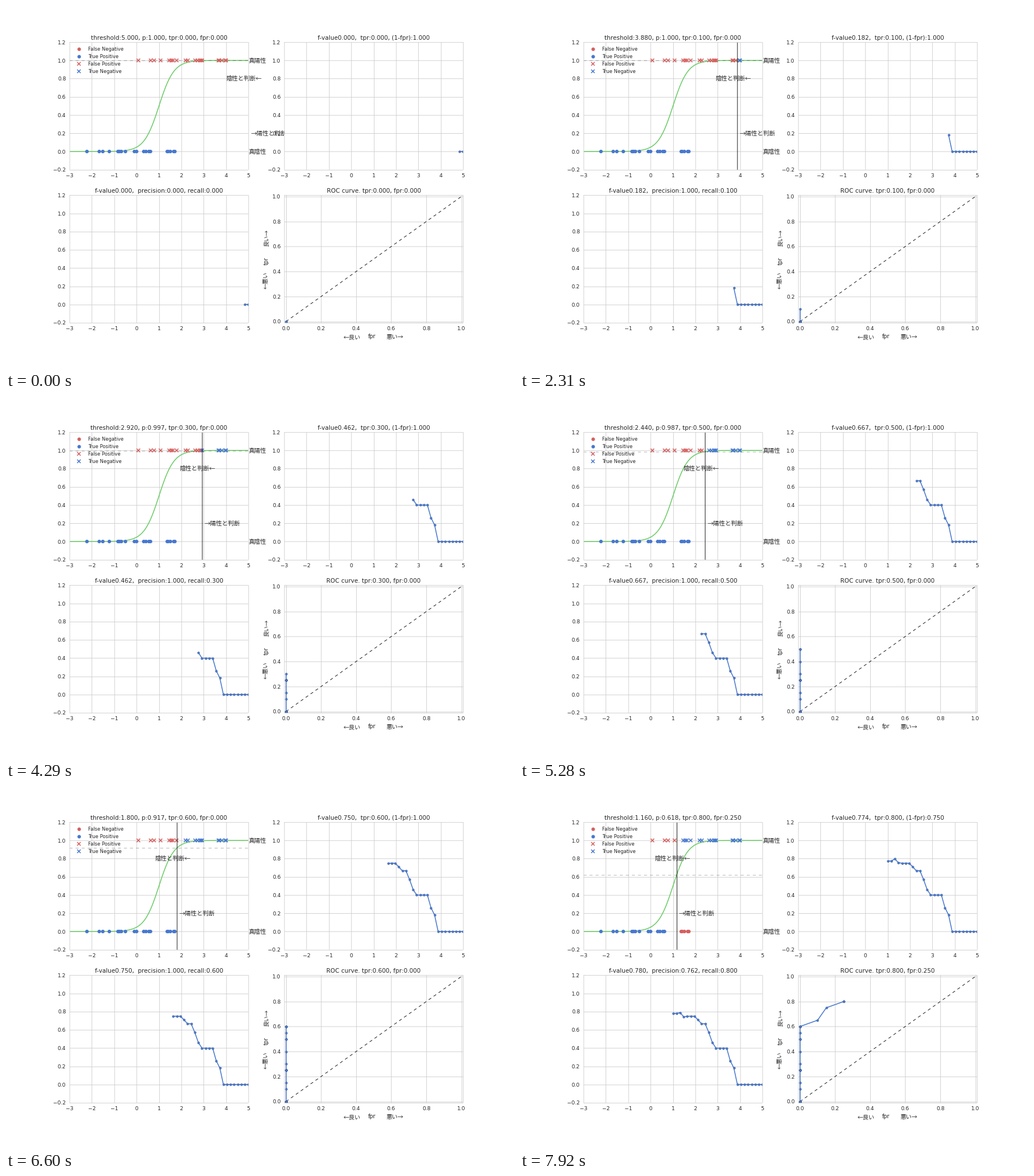
A matplotlib script for the animation above (8 s loop, 885 by 632 pixels).

```python
import numpy as np
import matplotlib.pyplot as plt
from matplotlib.animation import FuncAnimation
from matplotlib.transforms import IdentityTransform, blended_transform_factory

W, H, DPI = 885, 632, 72
BASE = (1008, 720)                    # layout canvas, shrunk to the stage
S = W / BASE[0]
STEP, START = 0.16, 5.0
STATES, HOLD = 25, 4
FRAMES = (STATES - 1) * HOLD + 1      # the last state is held only briefly
LOOP = 8000

BLUE, GREEN, RED = "#4878CF", "#6ACC65", "#D65F5F"
INK, GRID = "#262626", "#CCCCCC"
JP = "Noto Sans CJK JP"
DASH = (0, (6 * S, 6 * S))

pos = np.array([0.08, 0.63, 0.78, 1.07, 1.46, 1.55, 1.62, 1.79, 2.19, 2.29,
                2.62, 2.72, 2.83, 2.88, 2.93, 3.66, 3.70, 3.81, 3.97, 4.00])
neg = np.array([-2.22, -1.67, -1.51, -1.22, -0.83, -0.80, -0.76, -0.68, -0.50, -0.10,
                0.00, 0.32, 0.42, 0.55, 0.62, 1.37, 1.41, 1.51, 1.66, 1.71])

plt.rcParams.update({
    "font.family": ["DejaVu Sans", JP], "text.color": INK,
    "axes.titlesize": 10.4, "axes.titlepad": 5 * S, "axes.titley": 1.0,
    "xtick.labelsize": 9.1, "ytick.labelsize": 9.1,
    "xtick.major.size": 0, "ytick.major.size": 0,
    "xtick.major.pad": 7 * S, "ytick.major.pad": 7 * S,
    "xtick.labelcolor": INK, "ytick.labelcolor": INK,
    "lines.linewidth": 1.75 * S, "lines.scale_dashes": False,
})


def sigmoid(x):
    return 1 / (1 + np.exp(-3 * (x - 1)))


def harmonic(a, b):
    return 2 * a * b / (a + b) if a + b else 0.0


def measure(t):
    """tpr, fpr, precision, F of rates, F of precision and recall."""
    tp, fp = np.sum(pos >= t), np.sum(neg >= t)
    tpr, fpr = tp / len(pos), fp / len(neg)
    prec = tp / (tp + fp) if tp + fp else 0.0
    return tpr, fpr, prec, harmonic(tpr, 1 - fpr), harmonic(prec, tpr)


thresholds = START - STEP * np.arange(STATES)
stats = np.array([measure(t) for t in thresholds])
history = np.vstack([np.zeros(5), stats])
trail_x = START - STEP * np.arange(STATES + 1)

fig, ((ax_fit, ax_rate), (ax_prec, ax_roc)) = plt.subplots(
    2, 2, figsize=(W / DPI, H / DPI), dpi=DPI)
fig.subplots_adjust(left=0.125, right=0.9, bottom=0.125, top=0.9,
                    wspace=0.2, hspace=0.2)

for ax in (ax_fit, ax_rate, ax_prec):
    ax.set(xlim=(-3, 5), ylim=(-0.2, 1.2), xticks=np.arange(-3, 6),
           yticks=np.linspace(-0.2, 1.2, 8))
ax_roc.set(xlim=(-0.01, 1.01), ylim=(-0.01, 1.01),
           xticks=np.linspace(0, 1, 6), yticks=np.linspace(0, 1, 6))


def snapped(ax, value, axis):
    """Stage pixel of a value, aligned to pixel centres of the layout canvas."""
    size = (W, H)[axis]
    scale = size / BASE[axis]
    p = ax.transData.transform((value, value))[axis]
    p = p if axis == 0 else size - p
    p = (np.floor(p / scale + 0.5) + 0.5) * scale
    return p if axis == 0 else size - p


def rule(ax, value, axis, **kw):
    """Thin line across the axes: vertical for axis 0, horizontal for 1."""
    p = [snapped(ax, value, axis)] * 2
    pixel = IdentityTransform()
    if axis == 0:
        data, trans = (p, [0, 1]), blended_transform_factory(pixel, ax.transAxes)
    else:
        data, trans = ([0, 1], p), blended_transform_factory(ax.transAxes, pixel)
    return ax.plot(*data, transform=trans, lw=S, snap=False, scalex=False,
                   scaley=False, solid_capstyle="butt", **kw)[0]


for ax in fig.axes:
    ax.spines[:].set_visible(False)
    for axis, ticks, lim in ((0, ax.get_xticks(), ax.get_xlim()),
                             (1, ax.get_yticks(), ax.get_ylim())):
        for v in ticks:
            if lim[0] + 1e-6 < v < lim[1] - 1e-6:
                rule(ax, v, axis, color=GRID, zorder=0.5)
        for v in lim:
            rule(ax, v, axis, color=GRID, zorder=4.5, clip_on=False)


def pixel_text(x, y, s, size, **kw):
    kw = {"ha": "center", "va": "center", **kw}
    fig.text(x / W, 1 - y / H, s, size=size, **kw)


def jp_label(ax, x, y, s):
    return ax.text(x, y + 0.003, s, size=10.4, family=JP, va="center_baseline")


# threshold panel
curve_x = np.linspace(-3, 5, 200)
ax_fit.plot(curve_x, sigmoid(curve_x), color=GREEN)
level = rule(ax_fit, 1, 1, color="k", alpha=0.33, ls=DASH)
cut = rule(ax_fit, START, 0, color="k", zorder=4)
dots = ax_fit.scatter(neg, 0 * neg, s=39, lw=0, zorder=3)
crosses = ax_fit.scatter(pos, 0 * pos + 1, s=37, marker="x", lw=1.75 * S, zorder=3)
jp_label(ax_fit, 5, 1, "真陽性")
jp_label(ax_fit, 5, 0, "真陰性")
below = jp_label(ax_fit, 4, 0.8, "陰性と判断←")
above = jp_label(ax_fit, 5.1, 0.2, "→陽性と判断")

entries = [("False Negative", "o", RED), ("True Positive", "o", BLUE),
           ("False Positive", "x", RED), ("True Negative", "x", BLUE)]
box = ax_fit.get_position()
for i, (name, marker, color) in enumerate(entries):
    y = 75.2 + 13.1 * i
    ax_fit.plot((127.3 / W - box.x0) / box.width, (1 - y / H - box.y0) / box.height,
                marker, ms=6.15, mew=1.75 * S if marker == "x" else 0, color=color,
                transform=ax_fit.transAxes, zorder=5)
    ax_fit.text((143 / W - box.x0) / box.width, (1 - (y + 2.8) / H - box.y0) / box.height,
                name, size=8.4, transform=ax_fit.transAxes, zorder=5)


def trail(ax):
    line, = ax.plot([], [], color=BLUE)
    marks = ax.scatter([], [], s=16, color=BLUE, edgecolor="k", lw=0.15, zorder=3)
    return line, marks


def set_trail(pair, x, y):
    pair[0].set_data(x, y)
    pair[1].set_offsets(np.column_stack([x, y]))


rate_trail, prec_trail = trail(ax_rate), trail(ax_prec)
ax_roc.plot([0, 1], [0, 1], color="k", lw=S, ls=DASH)
roc_trail = trail(ax_roc)

for x, s in ((603, "←良い"), (678, "悪い→")):
    pixel_text(x, 577, s, 10, family=JP, va="center_baseline")
pixel_text(637.5, 577.5, "fpr", 9.5)
for y, s in ((479.5, "←悪い"), (404.5, "良い→")):
    pixel_text(453, y, s, 10, family=JP, rotation=90)
pixel_text(453.5, 445.5, "tpr", 9.5, rotation=90)


def update(frame):
    k = frame // HOLD
    t = thresholds[k]
    p = sigmoid(t)
    tpr, fpr, prec, f_rate, f_prec = stats[k]

    cut.set_xdata([snapped(ax_fit, t, 0)] * 2)
    level.set_ydata([snapped(ax_fit, p, 1)] * 2)
    below.set_x(t - 1)
    above.set_x(t + 0.1)
    dots.set_color(np.where(neg >= t, RED, BLUE))
    crosses.set_color(np.where(pos >= t, BLUE, RED))

    seen = history[:k + 2]
    set_trail(rate_trail, trail_x[:k + 2], seen[:, 3])
    set_trail(prec_trail, trail_x[:k + 2], seen[:, 4])
    set_trail(roc_trail, seen[:, 1], seen[:, 0])

    ax_fit.set_title(f"threshold:{t:.3f}, p:{p:.3f}, tpr:{tpr:.3f}, fpr:{fpr:.3f}")
    ax_rate.set_title(f"f-value{f_rate:.3f},  tpr:{tpr:.3f}, (1-fpr):{1 - fpr:.3f}")
    ax_prec.set_title(f"f-value{f_prec:.3f},  precision:{prec:.3f}, recall:{tpr:.3f}")
    ax_roc.set_title(f"ROC curve. tpr:{tpr:.3f}, fpr:{fpr:.3f}")
    return ()


anim = FuncAnimation(fig, update, frames=FRAMES, interval=LOOP / FRAMES,
                     init_func=lambda: update(0), repeat=True, repeat_delay=0)
plt.show()
```
